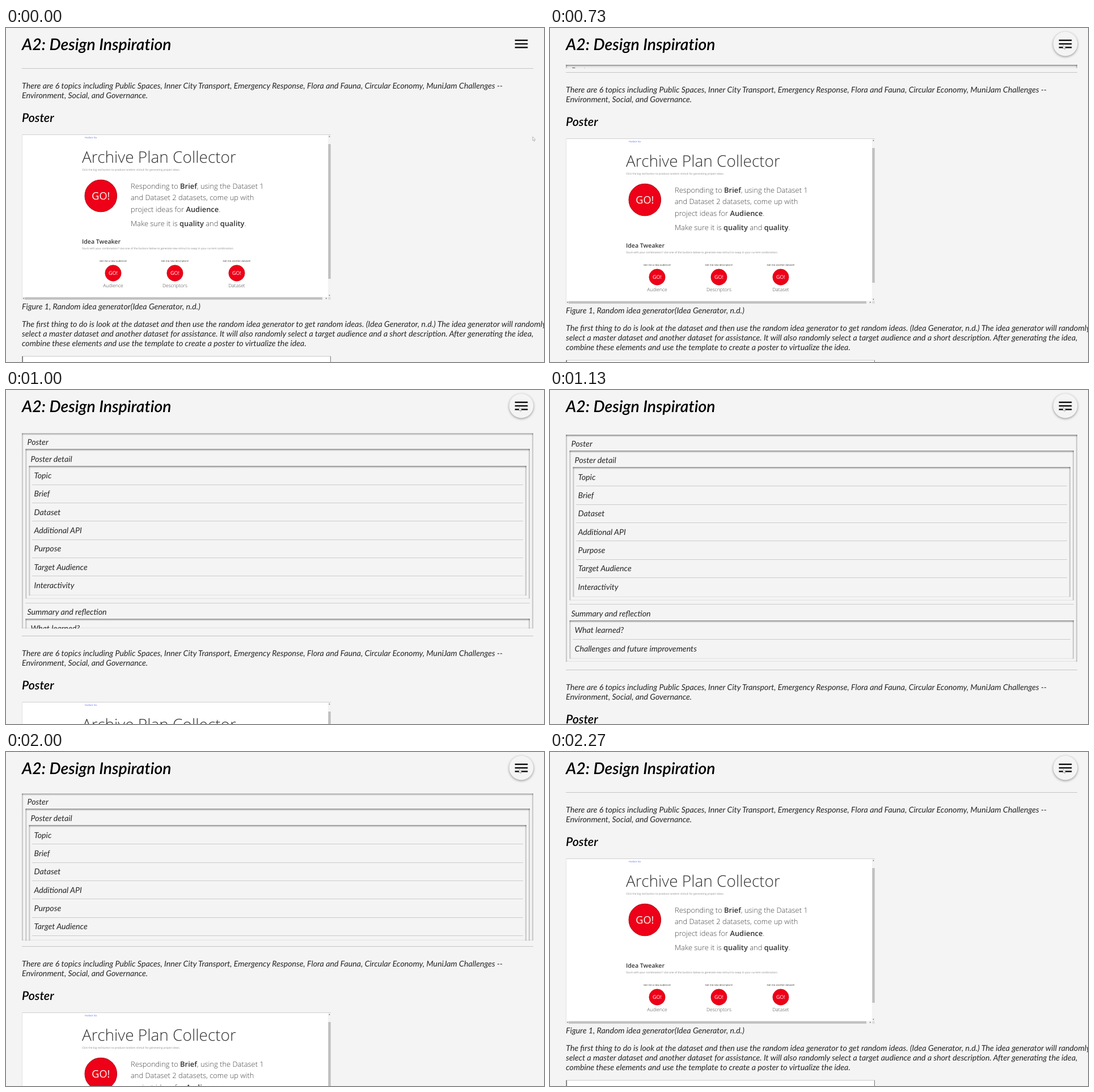
These frames come from a looping animation (949x590 px, 2740 ms). An HTML page with a canvas:

```html
<!DOCTYPE html>
<html lang="en">
<head>
<meta charset="utf-8">
<title>Design Inspiration</title>
<style>
  html, body { margin: 0; width: 100%; height: 100%; overflow: hidden; background: #f4f4f4; }
  canvas { display: block; }
</style>
</head>
<body>
<canvas id="stage" width="949" height="590"></canvas>
<script>
const ctx = document.getElementById('stage').getContext('2d');
const LOOP = 2740, FPS = 15;
const BG = '#f4f4f4', RED = '#ee0018', INK = '#262626';
const LEFT = 28, RIGHT = 930;
const BODY = 'italic 400 14.22px Lato, sans-serif';
const H1 = 'italic 600 28.44px Lato, sans-serif';
const H2 = 'italic 600 21.33px Lato, sans-serif';
const ui = (weight, size) => `${weight} ${size}px "Open Sans", sans-serif`;

// Menu box metrics when fully open
const MENU = { base: 64.3, margin: 14.2, height: 401.6, pad: 6 };
const HR_REST = 71, HR_MARGIN = 7.1;
const OPEN_AT = 698, CLOSE_AT = 1838, SLIDE = 400;

// Fractional glyph advances, without hinting to whole pixels
ctx.textRendering = 'geometricPrecision';

const clamp = v => Math.max(0, Math.min(1, v));
const swing = v => 0.5 - Math.cos(Math.PI * clamp(v)) / 2;

function rect(x, y, w, h, color) {
  ctx.fillStyle = color;
  ctx.fillRect(x, y, w, h);
}

function text(str, x, y, font, color, align = 'left') {
  ctx.font = font;
  ctx.fillStyle = color;
  ctx.textAlign = align;
  ctx.fillText(str, x, y);
}

// Plain and bold pieces alternate, starting with plain.
function mixed(parts, x, y, size) {
  parts.forEach((part, i) => {
    text(part, x, y, ui(i % 2 ? 600 : 300, size), i % 2 ? '#333' : '#444');
    x += ctx.measureText(part).width;
  });
}

function fade(x, y, w, h, dx, dy, alpha) {
  const x0 = dx < 0 ? x + w : x, y0 = dy < 0 ? y + h : y;
  const g = ctx.createLinearGradient(x0, y0, x0 + dx, y0 + dy);
  g.addColorStop(0, `rgba(0,0,0,${alpha})`);
  g.addColorStop(0.4, `rgba(0,0,0,${alpha * 0.55})`);
  g.addColorStop(1, 'rgba(0,0,0,0)');
  ctx.fillStyle = g;
  ctx.fillRect(x, y, w, h);
}

function insetBox(x0, y0, x1, y1) {
  const w = x1 - x0, h = y1 - y0;
  y0 = Math.round(y0);
  fade(x0, y0, w, 4, 0, 4, 0.46);
  fade(x0, y0, 3, h, 3, 0, 0.28);
  fade(x1 - 3, y0, 3, h, -3, 0, 0.28);
  fade(x0, Math.round(y1) - 2, w, 2, 0, -2, 0.09);
}

function rule(x0, x1, y) {
  rect(x0, Math.round(y), x1 - x0, 1, '#cbcbcb');
}

function menu(p) {
  const top = MENU.base + MENU.margin * p;
  const bottom = top + MENU.height * p;
  const shift = top + MENU.pad * p - 84.5;   // inner items are laid out for the open state
  const at = y => y + shift;
  const item = (str, x, y) => text(str, x, Math.round(at(y)), BODY, INK);

  ctx.save();
  ctx.beginPath();
  ctx.rect(LEFT, top, RIGHT - LEFT, bottom - top);
  ctx.clip();
  insetBox(LEFT, top, RIGHT, bottom);

  item('Poster', 37.5, 100.2);
  insetBox(34.5, at(107.3), 924, at(371.5));
  item('Poster detail', 43.5, 129.4);
  insetBox(40.5, at(136.4), 918, at(365.5));
  ['Topic', 'Brief', 'Dataset', 'Additional API', 'Purpose', 'Target Audience', 'Interactivity']
    .forEach((name, i) => {
      item(name, 49.5, 158.7 + 32.35 * i);
      if (i < 6) rule(46, 912, at(169.4 + 32.35 * i));
    });

  rule(34, 924, at(378.4));
  item('Summary and reflection', 37.5, 400.2);
  insetBox(34.5, at(407), 924, at(474.5));
  item('What learned?', 43.5, 429.2);
  rule(40, 918, at(439.8));
  item('Challenges and future improvements', 43.5, 461.8);
  ctx.restore();
  return bottom;
}

function goButton(x, y, r, size) {
  ctx.beginPath();
  ctx.arc(x, y, r, 0, Math.PI * 2);
  ctx.fillStyle = RED;
  ctx.fill();
  ctx.strokeStyle = '#a8141f';
  ctx.lineWidth = r / 28;
  ctx.stroke();
  text('GO!', x, y + size * 0.36, ui(400, size), '#fff', 'center');
}

function arrowhead(x, y, dx, dy) {
  ctx.fillStyle = '#777';
  ctx.beginPath();
  ctx.moveTo(x + dx * 1.3, y + dy * 1.3);
  ctx.lineTo(x - dx + dy * 1.3, y - dy + dx * 1.3);
  ctx.lineTo(x - dx - dy * 1.3, y - dy - dx * 1.3);
  ctx.fill();
}

function generator() {
  rect(29, 188, 544, 292, '#fff');
  rect(28, 188, 545, 1, '#cfcfcf');
  rect(28, 188, 1, 292, '#e4e4e4');
  rect(568, 189, 5, 291, '#f3f3f3');
  rect(29, 475, 544, 5, '#f3f3f3');
  rect(568.4, 205, 4.4, 238, '#c0c0c0');
  rect(33, 475.6, 525, 4.2, '#c0c0c0');
  rect(568.4, 475.4, 4.4, 4.4, '#dcdcdc');
  arrowhead(570.5, 191.5, 0, -1);
  arrowhead(570.5, 472.5, 0, 1);
  arrowhead(31, 477.6, -1, 0);
  arrowhead(565, 477.6, 1, 0);

  text('Harbor Six', 139, 194.6, ui(400, 4.4), '#5b6cf0');
  text('Archive Plan Collector', 134, 238, ui(300, 28), '#333');
  text('Click the big red button to produce random stimuli for generating project ideas.',
    134, 251.8, ui(400, 4.7), '#888');

  goButton(167.3, 296.5, 28.3, 18);
  mixed(['Responding to ', 'Brief', ', using the Dataset 1'], 220, 283.8, 12.9);
  mixed(['and Dataset 2 datasets, come up with'], 220, 304.4, 12.9);
  mixed(['project ideas for ', 'Audience', '.'], 220, 325, 12.9);
  mixed(['Make sure it is ', 'quality', ' and ', 'quality', '.'], 220, 350.4, 12.9);

  text('Idea Tweaker', 134, 380.5, ui(600, 10.6), '#333');
  text('Stuck with your combination? Use one of the buttons below to generate new stimuli to swap in your current combination.',
    134, 391.2, ui(400, 4.75), '#888');

  [['Get me a new audience!', 'Audience'],
   ['Get me new descriptors!', 'Descriptors'],
   ['Get me another dataset!', 'Dataset']].forEach(([hint, label], i) => {
    const x = 189 + 109 * i;
    text(hint, x, 412.6, ui(400, 4.3), '#333', 'center');
    goButton(x, 433, 14.2, 9);
    text(label, x, 458.2, ui(300, 8.5), '#444', 'center');
  });
}

function content(shift) {
  ctx.save();
  ctx.translate(0, shift);
  rect(LEFT, HR_REST, RIGHT - LEFT, 1, '#c4c4c4');
  const line = (str, y) => text(str, LEFT, y, BODY, INK);
  line('There are 6 topics including Public Spaces, Inner City Transport, Emergency Response, Flora and Fauna, Circular Economy, MuniJam Challenges --', 107);
  line('Environment, Social, and Governance.', 124);
  text('Poster', LEFT, 166, H2, '#000');
  generator();
  line('Figure 1, Random idea generator(Idea Generator, n.d.)', 497);
  line('The first thing to do is look at the dataset and then use the random idea generator to get random ideas. (Idea Generator, n.d.) The idea generator will randomly', 528);
  line('select a master dataset and another dataset for assistance. It will also randomly select a target audience and a short description. After generating the idea,', 545);
  line('combine these elements and use the template to create a poster to virtualize the idea.', 562);
  rect(28, 580, 545, 60, '#fff');
  rect(28, 579.5, 545, 1, '#c8c8c8');
  rect(28.5, 580, 1.2, 60, '#333');
  rect(572, 580, 1, 60, '#777');
  ctx.restore();
}

function heading() {
  ctx.save();
  ctx.letterSpacing = '0.01px';   // keeps "ti" from joining
  text('A2: Design Inspiration', LEFT, 39, H1, '#000');
  ctx.restore();
}

function menuButton(hover, pressed) {
  if (hover > 0) {
    ctx.save();
    ctx.shadowColor = `rgba(0,0,0,${0.42 * hover})`;
    ctx.shadowBlur = 4;
    ctx.shadowOffsetY = 1.3;
    ctx.beginPath();
    ctx.arc(909, 28, 21.4, 0, Math.PI * 2);
    ctx.fillStyle = pressed ? '#dadada' : BG;
    ctx.fill();
    ctx.restore();
  }
  for (let i = -1; i <= 1; i++) rect(897.7, 26.8 + 6.3 * i, 22.6, 2.5, '#111');
}

function pointer(x, y) {
  ctx.beginPath();
  ctx.moveTo(x, y);
  ctx.lineTo(x, y + 7);
  ctx.lineTo(x + 1.6, y + 5.5);
  ctx.lineTo(x + 2.8, y + 8);
  ctx.lineTo(x + 3.8, y + 7.5);
  ctx.lineTo(x + 2.8, y + 5.2);
  ctx.lineTo(x + 4.8, y + 5);
  ctx.closePath();
  ctx.fillStyle = '#fff';
  ctx.fill();
  ctx.strokeStyle = '#888';
  ctx.lineWidth = 0.6;
  ctx.stroke();
}

function draw(t) {
  const p = swing((t - OPEN_AT) / SLIDE) - swing((t - CLOSE_AT) / SLIDE);
  rect(0, 0, 949, 590, BG);
  heading();

  const bottom = p > 0 ? menu(p) : MENU.base;
  const hr = bottom + Math.max(HR_MARGIN, MENU.margin * p);
  content(Math.round(hr) - HR_REST);

  menuButton(clamp((t - 380) / 220), t >= 1800 && t < CLOSE_AT);
  const move = swing(t / 530);
  pointer(929 - 24 * move, 192 - 162 * move);
}

// The screen updates 15 times a second, on times rounded to 10 ms.
const tick = k => Math.round(k * 100 / FPS) * 10;

function frame() {
  const t = performance.now() % LOOP;
  let k = Math.floor(t * FPS / 1000) + 1;
  while (tick(k) > t) k--;
  draw(tick(k));
  requestAnimationFrame(frame);
}

frame();
</script>
</body>
</html>
```
